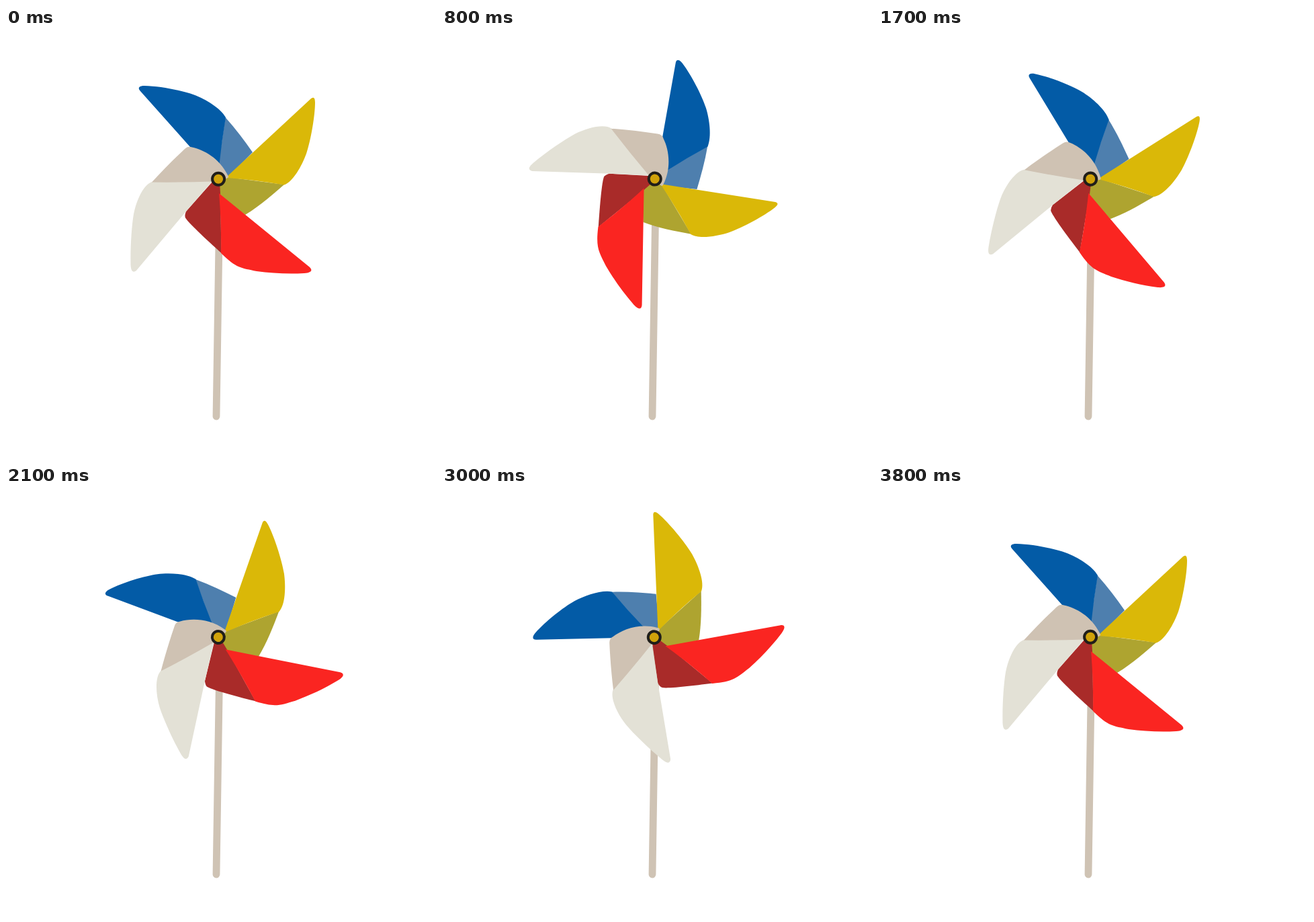
Write an HTML page that moves like this. It is 640 px wide and 640 px high and loops after 3900 ms.

```html
<!DOCTYPE html>
<html lang="en">
<head>
<meta charset="utf-8">
<title>Pinwheel</title>
<style>
  html, body { margin: 0; height: 100%; overflow: hidden; background: #fff; }
  svg { display: block; width: 100vw; height: 100vh; }
</style>
</head>
<body>
<svg viewBox="0 0 640 640">
  <path d="M313 578L318.2 240" stroke="#cfc3b4" stroke-width="10.8" stroke-linecap="round"/>
  <g id="wheel">
    <!-- blue -->
    <path fill="#4e7fae" d="M326.5 133C342 150 355 168 367 185L331 222L316 203Z"/>
    <path fill="#035ba6" d="M274 177L200 94C196 90 197 86 206 86C230 86.500 262 93 280 99.500C297 106 319 119 327 133Q321 168 317.500 203L300 205Z"/>
    <!-- yellow -->
    <path fill="#aea430" d="M414 233C396 249 376 266 356 278L318 250L316 224L330 222Z"/>
    <path fill="#dab808" d="M329 221L454 105C458 102 460 104 460 111C460 130 454 166 447 187C440 206 427 229 414 233.500Q370 226 329 223Z"/>
    <!-- red -->
    <path fill="#a92b29" d="M307 229L268 273Q265.500 279 267 282.500C273 292 305 321 320.500 335L319 246L318 229Z"/>
    <path fill="#fa2521" d="M317 246L452 356C457 361 454 364 444 365C420 366.500 395 365 373 362C350 357 343 358 320 335C320.500 305 319.500 275 317 246Z"/>
    <!-- cream -->
    <path fill="#e3e1d6" d="M217 229L307 228L268 273L194 361C190 364 186 364 185.500 352C185 325 187 295 190 277C194 256 205 233 217 229Z"/>
    <path fill="#cfc2b3" d="M217 229.500C233 212 250 195 266 180Q271 175 277 177.500C294 181 318 194 330 219Q333 223 328 224L318 228L306 228.500Q262 230 217 229.500Z"/>
    <circle cx="316.100" cy="224.700" r="9" fill="#d0a20a" stroke="#201e1a" stroke-width="4"/>
  </g>
</svg>
<script>
const LOOP = 3900, STEP = 100;
const TURN_FRAMES = 94.6; // length of the spin at 25 frames per second
const wheel = document.getElementById('wheel');

// One coordinate of a symmetric cubic Bezier with handles a and 1 - a
const bezier = (a, u) =>
  3 * a * u * (1 - u) ** 2 + 3 * (1 - a) * u * u * (1 - u) + u ** 3;

function ease(x) {
  let lo = 0, hi = 1;
  for (let i = 0; i < 30; i++) {
    const mid = (lo + hi) / 2;
    if (bezier(0.668, mid) < x) lo = mid; else hi = mid;
  }
  return bezier(0.012, lo);
}

function draw(now) {
  const step = Math.floor((now % LOOP) / STEP);
  const frame = Math.floor(step * 2.5);
  const angle = 1080 * ease(Math.min(1, frame / TURN_FRAMES));
  wheel.setAttribute('transform', `rotate(${angle} 316.5 225.3)`);
  requestAnimationFrame(() => draw(performance.now() - start));
}

const start = performance.now();
draw(0);
</script>
</body>
</html>
```
